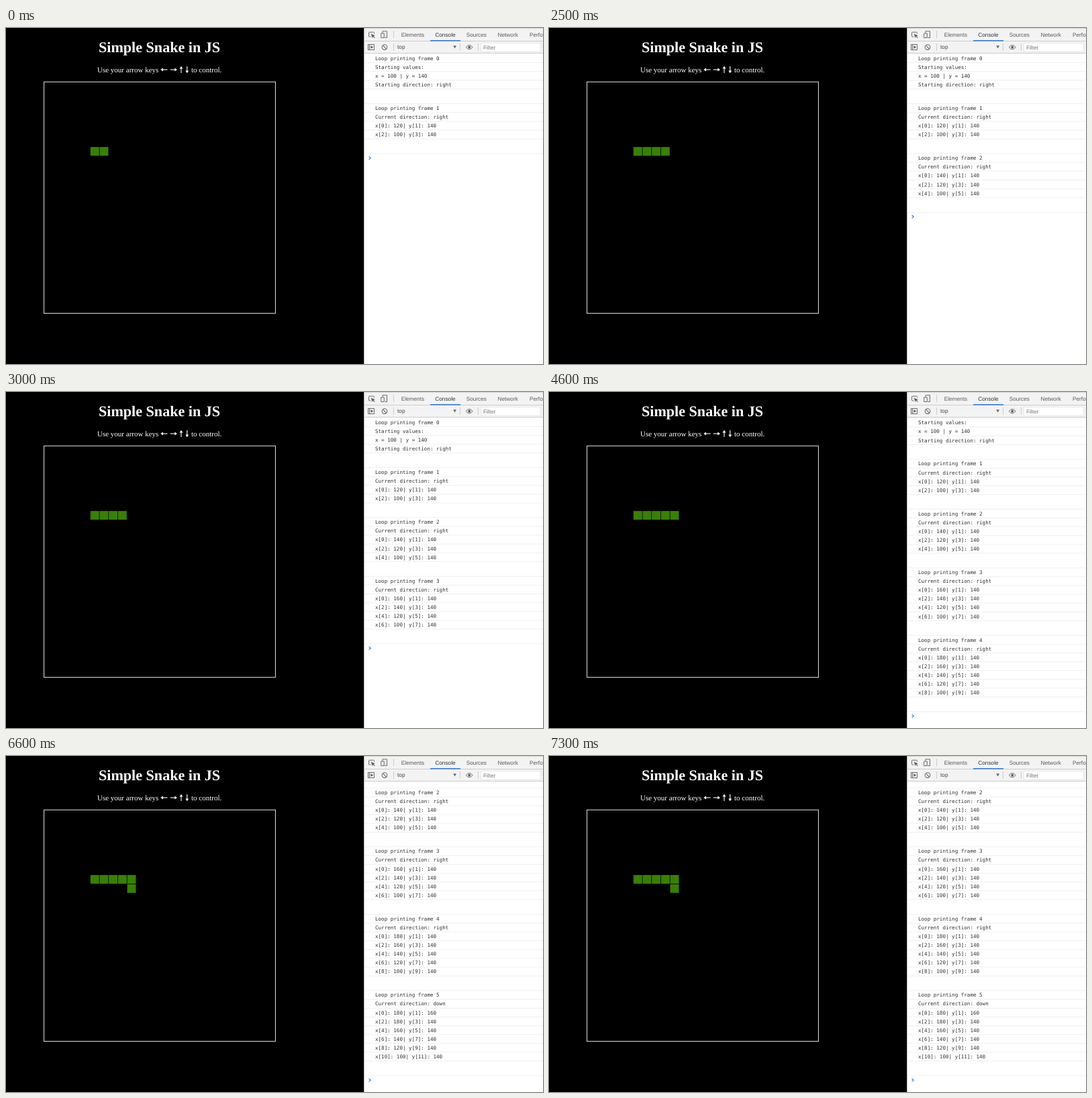
These frames come from a looping animation (800 px wide and 500 px high, 8000 ms). An HTML page:

```html
<!DOCTYPE html>
<html lang="en">
<head>
<meta charset="utf-8">
<title>Simple Snake in JS</title>
<style>
html, body { margin: 0; width: 100%; height: 100%; overflow: hidden; background: #000; }
svg { display: block; width: 800px; height: 500px; }
text { text-rendering: geometricPrecision; white-space: pre; }
.page { font-family: "Liberation Serif", Times, serif; fill: #fff; }
.ui { font: 8.25px "Liberation Sans", Arial, sans-serif; fill: #5a5a5a; }
.log { font: 7.57px "DejaVu Sans Mono", monospace; fill: #303030; }
.icon { fill: none; stroke: #6a6a6a; stroke-width: 1; }
</style>
</head>
<body>
<svg viewBox="0 0 800 500">
  <rect width="800" height="500" fill="#000"/>
  <g class="page">
    <text x="138" y="35.6" font-size="22.1" font-weight="bold">Simple Snake in JS</text>
    <text x="136" y="65.6" font-size="11">Use your arrow keys</text>
    <text x="276" y="65.6" font-size="11">to control.</text>
    <g id="arrows"></g>
  </g>
  <rect x="56.6" y="80.2" width="344.8" height="344.4" fill="none" stroke="#e4e4e4"/>
  <g id="snake" fill="#388004"></g>

  <rect x="533" width="267" height="500" fill="#fff"/>
  <g id="console"></g>

  <rect x="533" width="267" height="38" fill="#f3f3f3"/>
  <path d="M533 19.5H800M533 37.5H800" stroke="#cdcdcd"/>
  <path d="M533 .4H800" stroke="#c4c4c4" stroke-width=".8"/>
  <path d="M533.5 0V500" stroke="#b4b4b4"/>
  <path d="M577.5 4V15M577.5 23V34M676.5 23V34M703.5 23V34" stroke="#cdcdcd"/>
  <rect x="632" y="18" width="45" height="1.6" fill="#3b7fd9"/>
  <rect x="707.5" y="22.5" width="89" height="12.5" fill="#fff" stroke="#e3e3e3" stroke-width=".7"/>
  <g class="ui">
    <text x="588.7" y="12.6">Elements</text>
    <text x="639.3" y="12.6" fill="#333">Console</text>
    <text x="685.7" y="12.6">Sources</text>
    <text x="732.5" y="12.6">Network</text>
    <text x="780" y="12.6">Performance</text>
    <text x="583" y="31.3" fill="#444">top</text>
    <text x="711" y="31.5" fill="#757575">Filter</text>
  </g>
  <path d="M666.2 26.2H671L668.6 30.6Z" fill="#6a6a6a"/>
  <g class="icon">
    <path d="M543.5 13H541.5Q540.5 13 540.5 12V7.2Q540.5 6.2 541.5 6.2H547.5Q548.5 6.2 548.5 7.2V8.5"/>
    <path d="M543.8 8.8L549.8 11.2L547.6 12L549.6 14.2L548.8 15L546.7 12.8L545.7 14.8Z" fill="#5a5a5a" stroke="none"/>
    <path d="M561 7.5V4.8H567.5V14.5H564.5M558.7 8H563.3V14.5H558.7Z"/>
    <path d="M539.5 24.5H548.5V32.5H539.5ZM541.5 24.5V32.5"/>
    <path d="M543.4 26.3L547.2 28.5L543.4 30.7Z" fill="#5a5a5a" stroke="none"/>
    <circle cx="564" cy="28.6" r="3.8" stroke-width="1.1"/>
    <path d="M561.4 25.9L566.7 31.3" stroke-width="1.1"/>
    <path d="M685.2 28.6Q690.2 22.4 695.2 28.6Q690.2 34.8 685.2 28.6Z"/>
    <circle cx="690.2" cy="28.6" r="1.9" fill="#5a5a5a" stroke="none"/>
  </g>
</svg>
<script>
const LOOP = 8000, ROW = 13.1, BLANK = 21.85, TOP = 38.4, PROMPT_MAX = 475.75;
const UNIT = 0.685;

// start time, snake cells, printed loop number
const STATES = [
  [0, 2, 1], [500, 3, 2], [2500, 4, 2], [2600, 4, 3],
  [4500, 5, 3], [4600, 5, 4], [6600, 6, 5]
];
const trail = [100, 120, 140, 160, 180].map(x => [x, 140]).concat([[180, 160]]);

const $ = id => document.getElementById(id);

function arrow(x, y, turn) {
  return `<g transform="translate(${x} ${y}) rotate(${turn})">` +
    '<path d="M-5 0H3" stroke="#fff" stroke-width="1.1"/>' +
    '<path d="M5.3 0L1.6-2.5V2.5Z"/></g>';
}

function cell([x, y]) {
  const left = 57.3 + x * UNIT, top = 81.2 + y * UNIT;
  return `<rect x="${left.toFixed(2)}" y="${top.toFixed(2)}" width="12.9" height="12.9"/>`;
}

// Lines printed in one pass; the empty string is the taller blank entry.
function printed(n) {
  if (!n) return ['Loop printing frame 0', 'Starting values:', 'x = 100 | y = 140',
    'Starting direction: right', ''];
  const body = trail.slice(0, n + 1).reverse();
  return [
    'Loop printing frame ' + n,
    'Current direction: ' + (n < 5 ? 'right' : 'down'),
    ...body.map(([x, y], i) => `x[${2 * i}]: ${x}| y[${2 * i + 1}]: ${y}`),
    ''
  ];
}

function consoleView(last) {
  let y = TOP, rows = '';
  for (let n = 0; n <= last; n++) {
    for (const line of printed(n)) {
      if (line) rows += `<text class="log" x="550" y="${(y + 9.3).toFixed(2)}">${line}</text>`;
      y += line ? ROW : BLANK;
      rows += `<path d="M534 ${y.toFixed(2)}H800" stroke="#ededed" stroke-width=".8"/>`;
    }
  }
  const scroll = Math.max(0, y - PROMPT_MAX);
  rows += `<path d="M540.6 ${y + 4.3}L543.2 ${y + 6.6}L540.6 ${y + 8.9}" ` +
    'fill="none" stroke="#3b7fd9" stroke-width="1.2"/>';
  return `<g transform="translate(0 ${-scroll})">${rows}</g>`;
}

let shown;
function draw(t) {
  const state = STATES.findLast(s => s[0] <= t);
  if (state === shown) return;
  shown = state;
  $('snake').innerHTML = trail.slice(0, state[1]).map(cell).join('');
  $('console').innerHTML = consoleView(state[2]);
}

$('arrows').innerHTML = arrow(235.6, 62, 180) + arrow(249.7, 62, 0) +
  arrow(261, 62, -90) + arrow(269.8, 62, 90);

const start = performance.now();
function tick() {
  draw((performance.now() - start) % LOOP);
  requestAnimationFrame(tick);
}
tick();
</script>
</body>
</html>
```
